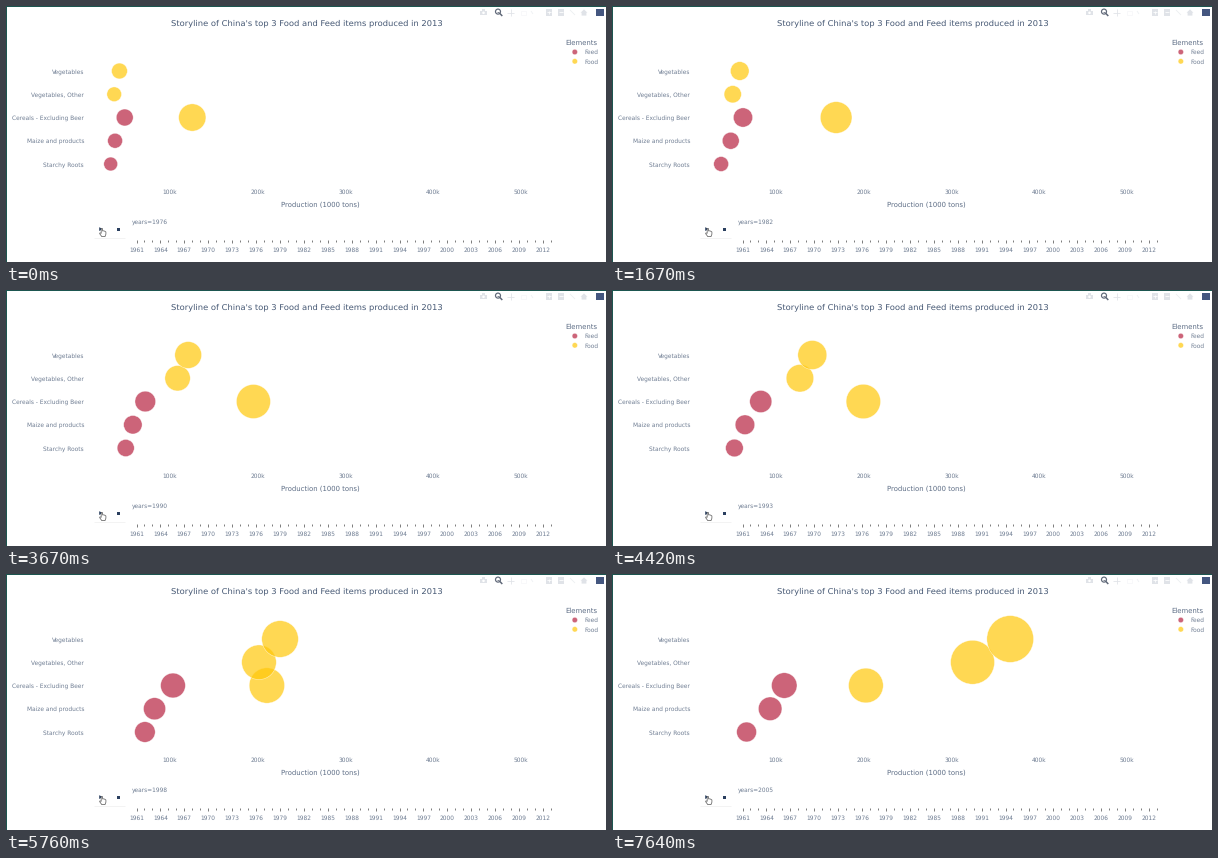
A matplotlib script that plays this animation: 600x256 px, repeating every 7670 ms.

```python
import numpy as np
import matplotlib.pyplot as plt
from matplotlib.animation import FuncAnimation
from matplotlib.patches import Circle, Polygon, Rectangle

W, H, DPI = 600, 256, 100
FRAMES, STEP = 295, 26          # one loop = 7670 ms
YEAR_MS = 262
PX = 72 / DPI
INK, FEED, FOOD = "#2a3f5f", "#b72240", "#ffc80a"
PALE, EDGE = "#e0e3e8", "#1d5650"
SMALL, MEDIUM, LARGE = 5.9, 6.88, 8.33

plt.rcParams.update({
    "font.family": "DejaVu Sans",
    "text.hinting": "none",
    "toolbar": "None",
})

fig = plt.figure(figsize=(W / DPI, H / DPI), dpi=DPI, facecolor="white")
ax = fig.add_axes([0, 0, 1, 1])
ax.set_xlim(0, W)
ax.set_ylim(H, 0)
ax.axis("off")


def label(x, y, s, size=SMALL, ha="center"):
    # smaller text looks fainter
    return ax.text(x, y, s, fontsize=size * PX, color=INK, ha=ha,
                   va="center_baseline", alpha=0.68 + 0.08 * (size - SMALL))


def rect(x, y, w, h, color, fill=True, lw=0.6):
    ax.add_patch(Rectangle((x, y), w, h, fc=color if fill else "none",
                           ec="none" if fill else color, lw=lw * PX))


def line(xs, ys, color, lw=0.8):
    ax.plot(xs, ys, color=color, lw=lw * PX, solid_capstyle="butt")


def poly(points, fc, ec="none", lw=0.0):
    ax.add_patch(Polygon(points, fc=fc, ec=ec, lw=lw * PX))


def dot(x, y, r, color, lw=0.5):
    return ax.add_patch(Circle((x, y), r, fc=color, ec="white", lw=lw * PX,
                               alpha=0.7, zorder=3))


def row_y(i):
    return 65 + 23.25 * i


def tons_to_x(k):
    return 76.6 + 0.8775 * k


def draw_chart():
    label(300.7, 16.5, "Storyline of China's top 3 Food and Feed items "
                       "produced in 2013", LARGE)
    rows = ["Vegetables", "Vegetables, Other", "Cereals - Excluding Beer",
            "Maize and products", "Starchy Roots"]
    for i, name in enumerate(rows):
        label(78, row_y(i), name, ha="right")
    for k in range(100, 600, 100):
        label(tons_to_x(k) - 0.4, 185.5, f"{k}k")
    label(314, 198.7, "Production (1000 tons)", MEDIUM)

    label(559.6, 36.6, "Elements", MEDIUM, "left")
    for y, name, color in [(46, "Feed", FEED), (55.3, "Food", FOOD)]:
        dot(568.8, y, 2.7, color)
        label(578, y, name, ha="left")


def draw_slider():
    for i in range(53):
        x = 130.5 + 7.97 * i
        major = i % 3 == 0
        line([x, x], [234.4, 236.6 if major else 236], "#4a4a4a", 0.7)
        if major:
            label(x, 243.6, str(1961 + i))


def draw_buttons():
    line([88, 119], [231.5, 231.5], "#f1f1f1")
    poly([(93.2, 221.2), (93.2, 225), (97, 223.1)], INK)
    rect(111, 221.6, 3, 3, INK)
    hand = [(95.2, 222.4), (96.3, 222.4), (96.6, 225), (97.8, 224.8),
            (98.9, 225.3), (99.9, 226), (99.9, 228.2), (99, 230.6),
            (95.8, 230.6), (93.6, 227.6), (94, 226.8), (95.2, 227.4)]
    poly(hand, "white", "#6a6a6a", 0.8)


def draw_toolbar():
    # camera
    rect(474, 4.5, 7, 4.8, PALE)
    rect(476, 3.4, 3, 1.4, PALE)
    ax.add_patch(Circle((477.5, 6.8), 1.3, fc="white"))
    # zoom
    ax.add_patch(Circle((492, 5.6), 2.5, fc="none", ec="#5f6878", lw=1.2 * PX))
    line([493.8, 496.3], [7.4, 10], "#5f6878", 1.5)
    line([490.8, 493.2], [5.6, 5.6], "#5f6878")
    # pan
    line([501, 508], [6.5, 6.5], PALE)
    line([504.5, 504.5], [3, 10], PALE)
    # selections
    rect(515, 4.5, 4.5, 4, "#f4f5f7", fill=False)
    line([525, 527], [5, 8], "#eef0f3")
    # zoom in and out
    for x, plus in [(540, True), (552, False)]:
        rect(x, 3.2, 6, 6.4, PALE)
        line([x + 1.3, x + 4.7], [6.4, 6.4], "white")
        if plus:
            line([x + 3, x + 3], [4.7, 8.1], "white")
    # autoscale and home
    line([564, 569], [4, 9], "#eceef1")
    poly([(574.6, 6.7), (578, 3.4), (581.4, 6.7), (580.4, 6.7),
          (580.4, 9.6), (575.6, 9.6), (575.6, 6.7)], PALE)
    rect(590, 2.6, 7.6, 7.6, "#44567f")


def warp(t):
    """Years since the start: a linear move, then a short rest."""
    p = np.asarray(t) / YEAR_MS - 0.07
    n = np.floor(p)
    return n + np.minimum((p - n) / 0.85, 1)


# a few key times, and the kilotons of each item at them
KEYS = warp([0, 1670, 2820, 4420, 5760, 6520, 7640])
SERIES = [
    (2, FEED, [48, 62, 60, 82, 103, 111, 109]),
    (3, FEED, [37, 48, 50, 64, 82, 88, 93]),
    (4, FEED, [32, 37, 46, 52, 71, 72, 66]),
    (2, FOOD, [125, 168, 190, 199, 210, 207, 202]),
    (1, FOOD, [36, 50, 89, 126, 201, 282, 324]),
    (0, FOOD, [42, 58, 99, 140, 225, 315, 367]),
]

draw_chart()
draw_slider()
draw_buttons()
draw_toolbar()
rect(0, 0, W, 1, EDGE)
rect(0, 0, 1, H, EDGE)

bubbles = [dot(0, row_y(row), 1, color) for row, color, _ in SERIES]
year_text = label(126, 215.8, "", ha="left")


def update(i):
    t = (i + 0.5) * STEP
    now = warp(t)
    for bubble, (row, _, tons) in zip(bubbles, SERIES):
        k = np.interp(now, KEYS, tons)
        bubble.center = (tons_to_x(k), row_y(row))
        bubble.radius = 1.22 * np.sqrt(k)   # area follows tons
    year_text.set_text(f"years={1976 + int(t / YEAR_MS + 0.45)}")
    return [*bubbles, year_text]


anim = FuncAnimation(fig, update, frames=FRAMES, interval=STEP,
                     repeat=True, repeat_delay=0, blit=False)
plt.show()
```
